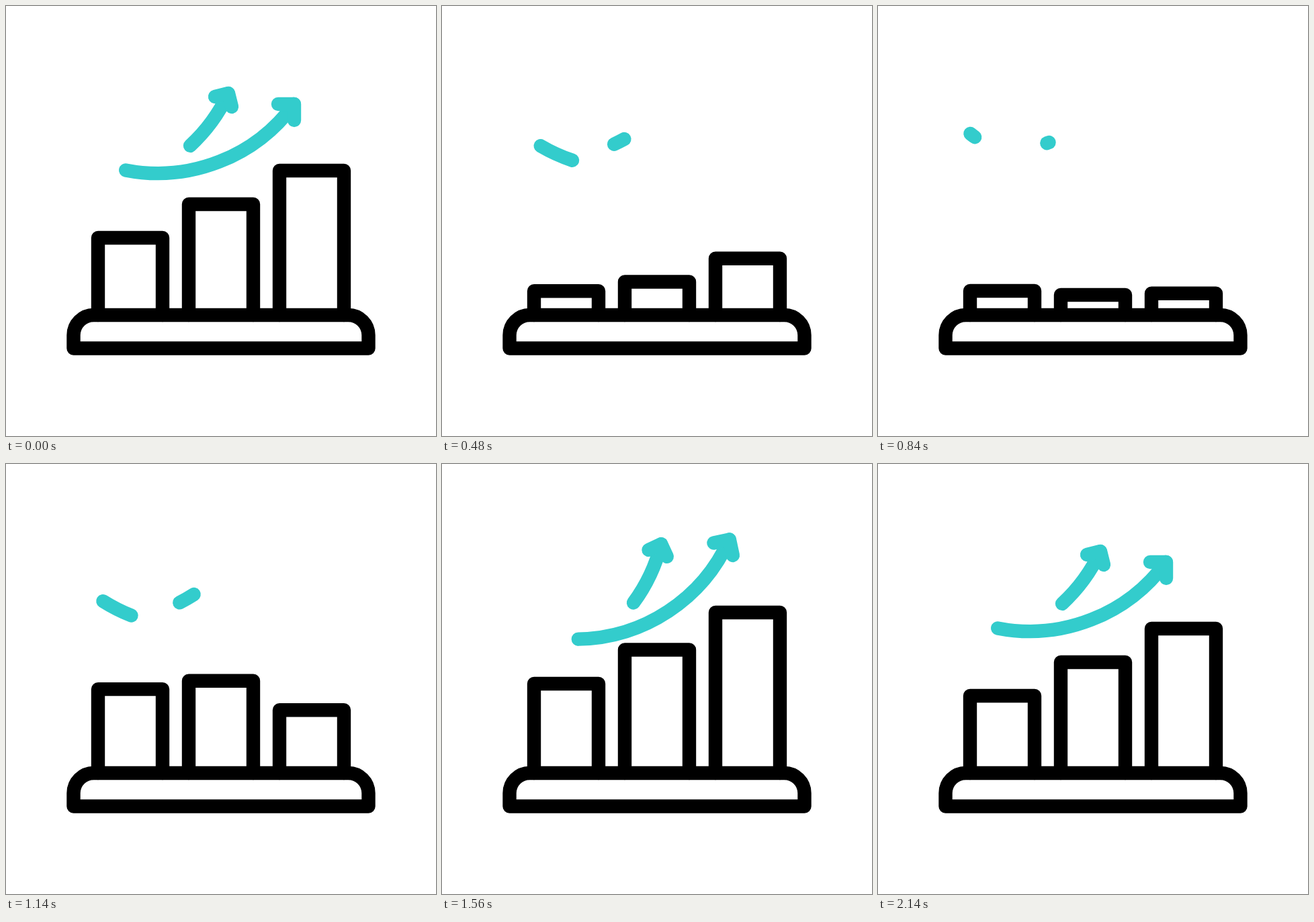
An HTML page with a canvas for the animation above (2420 ms loop, 640x640 px).

```html
<!DOCTYPE html>
<html lang="en">
<head>
<meta charset="utf-8">
<title>Growth chart</title>
<style>
  html, body { margin: 0; width: 100%; height: 100%; overflow: hidden; background: #fff; }
  canvas { display: block; width: 640px; height: 640px; }
</style>
</head>
<body>
<canvas id="stage" width="640" height="640"></canvas>
<script>
const ctx = document.getElementById('stage').getContext('2d');
const LOOP = 2420, STEP = 20, RAD = Math.PI / 180;
const TEAL = '#33cccc';

const wave = p => (1 - Math.cos(Math.PI * p)) / 2;

// Cubic bezier easing (.17, 0, .5, 1), solved by bisection
function swift(p) {
  let lo = 0, hi = 1, s = 0.5;
  for (let i = 0; i < 24; i++) {
    s = (lo + hi) / 2;
    const q = 1 - s;
    const x = 3 * q * q * s * 0.17 + 3 * q * s * s * 0.5 + s * s * s;
    if (x < p) lo = s; else hi = s;
  }
  return s * s * (3 - 2 * s);
}

// Each move: [start, end, target value, easing]
function track(from, ...moves) {
  return t => {
    let v = from;
    for (const [a, b, to, ease] of moves) {
      if (t <= a) break;
      v += (to - v) * (t >= b ? 1 : ease((t - a) / (b - a)));
    }
    return v;
  };
}

const bars = [
  { x: 137, y: 345, drop: track(0, [0, 620, 85, swift], [800, 1280, -22, swift], [1400, 1970, 0, wave]) },
  { x: 272, y: 295, drop: track(0, [0, 716, 135, swift], [890, 1370, -18.5, swift], [1620, 2140, 0, wave]) },
  { x: 407, y: 245, drop: track(0, [0, 905, 184, swift], [1020, 1500, -24, swift], [1650, 2140, 0, wave]) }
];

const arrows = [
  {
    pivot: [268.3, 134.5], hub: [226, -2], r: 251, a0: 101, a1: 36.1,
    head: [[429, 170], [429, 146], [405, 146]],
    turn: track(0, [0, 930, 28, swift], [956, 1660, -14, wave], [1660, 2140, 0, swift]),
    shaft: track(1, [0, 733, 0.03, swift], [1016, 1522, 1, wave])
  },
  {
    pivot: [272, 150], hub: [104.5, 24.2], r: 250, a0: 47.3, a1: 25.1,
    head: [[336, 150], [331, 130], [311, 135]],
    turn: track(0, [0, 800, 22.8, swift], [971, 1529, -11, wave], [1529, 2140, 0, wave]),
    shaft: track(1, [0, 720, 0.035, swift], [1004, 1434, 1, wave])
  }
];

function drawHead(pts, part) {
  if (part <= 0) return;
  ctx.beginPath();
  ctx.moveTo(...pts[0]);
  for (let i = 0; i < 2; i++) {
    const k = Math.min(1, part * 2 - i);
    if (k <= 0) break;
    const [x, y] = pts[i], [u, v] = pts[i + 1];
    ctx.lineTo(x + (u - x) * k, y + (v - y) * k);
  }
  ctx.stroke();
}

function drawArrow(a, t) {
  const part = a.shaft(t);
  const [px, py] = a.pivot;
  ctx.save();
  ctx.translate(px, py);
  ctx.rotate(a.turn(t) * RAD);
  ctx.translate(-px, -py);
  ctx.beginPath();
  ctx.arc(...a.hub, a.r, a.a0 * RAD, (a.a0 + (a.a1 - a.a0) * part) * RAD, true);
  ctx.stroke();
  drawHead(a.head, Math.min(1, (part - 0.89) / 0.11));
  ctx.restore();
}

function drawBar(b, t) {
  const y = b.y + b.drop(t);
  ctx.beginPath();
  ctx.moveTo(b.x, 460);
  ctx.lineTo(b.x, y);
  ctx.lineTo(b.x + 96, y);
  ctx.lineTo(b.x + 96, 460);
  ctx.stroke();
}

function drawBase() {
  ctx.beginPath();
  ctx.moveTo(100.5, 509.5);
  ctx.lineTo(100.5, 490);
  ctx.arc(130.5, 490, 30, Math.PI, 1.5 * Math.PI);
  ctx.arc(509.5, 490, 30, 1.5 * Math.PI, 0);
  ctx.lineTo(539.5, 509.5);
  ctx.closePath();
  ctx.stroke();
}

function draw(t) {
  ctx.fillStyle = '#fff';
  ctx.fillRect(0, 0, 640, 640);
  ctx.lineCap = ctx.lineJoin = 'round';
  ctx.lineWidth = 20.4;
  ctx.strokeStyle = '#000';
  bars.forEach(b => drawBar(b, t));
  drawBase();
  ctx.strokeStyle = TEAL;
  arrows.forEach(a => drawArrow(a, t));
}

const begin = performance.now();
function tick() {
  const t = (performance.now() - begin) % LOOP;
  draw(Math.floor(t / STEP) * STEP);
  requestAnimationFrame(tick);
}
tick();
</script>
</body>
</html>
```
